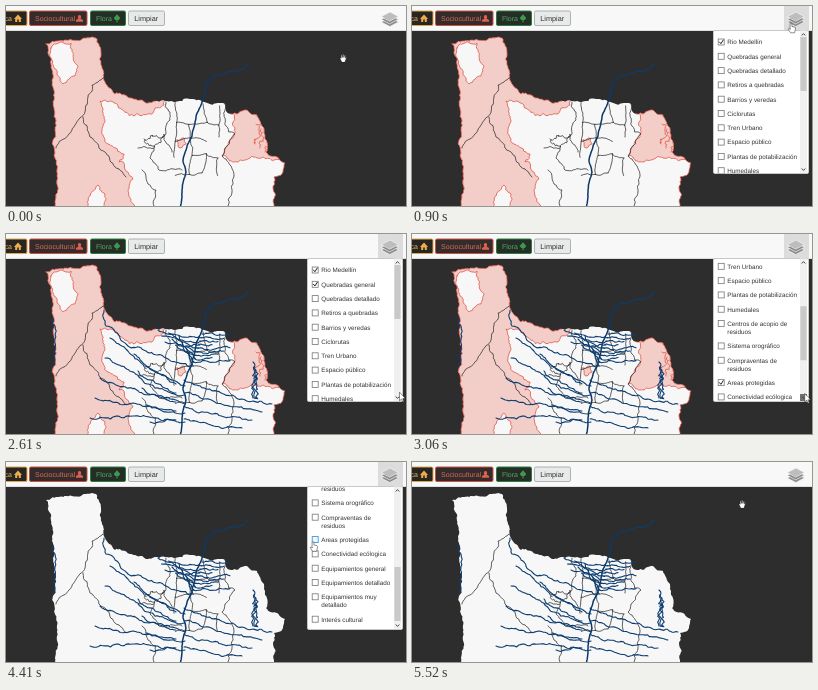
These frames come from a looping animation (400x200 px, 5550 ms). An HTML page:

```html
<!DOCTYPE html>
<html lang="es">
<head>
<meta charset="utf-8">
<title>Mapa de capas</title>
<style>
html, body { margin: 0; width: 100%; height: 100%; overflow: hidden; background: #2d2d2d; }
svg { display: block; width: 100vw; height: 100vh; }
text { font-family: "Liberation Sans", Arial, sans-serif; font-size: 7px; text-rendering: geometricPrecision; }
path { fill: none; stroke-linejoin: round; stroke-linecap: round; }
#rows text { font-size: 6.3px; fill: #333; }
#rows rect { fill: #fff; stroke: #777; stroke-width: .8; }
#rows rect.hover { fill: #eef8ff; stroke: #2e8bd0; }
#rows path { stroke: #222; }
.land, .hole { fill: #f7f7f7; }
.pink { fill: #f3cec9; }
.pink, .hole, .red { stroke: #e05648; stroke-width: .8; }
.border { stroke: #2a2a2a; stroke-width: .75; }
.stream { stroke: #0c3d70; stroke-width: 1.1; }
.river { stroke: #0b3867; stroke-width: 1.5; }
#cursor path { fill: #fff; stroke: #222; stroke-width: .5; }
</style>
</head>
<body>
<svg viewBox="0 0 400 200" preserveAspectRatio="none">
  <defs>
    <clipPath id="landClip"></clipPath>
    <clipPath id="sides"><path d="M0 0H150V200H0ZM224 0H400V200H224Z"/></clipPath>
    <clipPath id="panelClip"><rect x="302" y="24.5" width="86" height="143"/></clipPath>
  </defs>
  <rect width="400" height="200" fill="#2d2d2d"/>

  <g id="base"></g>
  <g id="pink">
    <g id="areas" clip-path="url(#landClip)"></g>
    <g id="edge" clip-path="url(#sides)"></g>
  </g>
  <g id="borders"></g>
  <g id="river"></g>
  <g id="streams"></g>

  <rect width="400" height="24" fill="#f8f8f8"/>
  <rect y="24" width="400" height="1" fill="#dedede"/>
  <rect x="-20" y="5" width="41" height="14.5" rx="1.5" fill="#292622" stroke="#d9a84c"/>
  <rect x="23.5" y="5" width="57.5" height="14.5" rx="1.5" fill="#332c2b" stroke="#c9503f"/>
  <rect x="84.5" y="5" width="35" height="14.5" rx="1.5" fill="#252d27" stroke="#2b7c3c"/>
  <rect x="122.5" y="5" width="36" height="14.5" rx="1.5" fill="#e8eaea" stroke="#adb2b2"/>
  <text x="-1.5" y="15" fill="#efb765">ca</text>
  <path d="M8 13 12 8.6 16 13H14.8V16H12.8V13.5H11.2V16H9.2V13Z" style="fill:#f0ad4e"/>
  <text x="29" y="15" fill="#d96b5c">Sociocultural</text>
  <path d="M73.5 9a1.7 2 0 0 1 1 3.6L77 14V15.8H70V14L72.5 12.6A1.7 2 0 0 1 73.5 9Z" style="fill:#e0604f"/>
  <text x="90" y="15" fill="#57a765">Flora</text>
  <path d="M111 8.2 114.3 12 112.8 14H111.6V16.2H110.4V14H109.2L107.7 12Z" style="fill:#3c9a4d"/>
  <text x="128.3" y="15" fill="#333" style="font-size:7.3px">Limpiar</text>

  <rect id="pressed" x="372" y="0" width="25" height="24" fill="#dcdcdc"/>
  <g id="layers"></g>

  <g id="panel">
    <rect x="301.5" y="24.5" width="95" height="143" rx="1.5" fill="#fff" stroke="#c8c8c8"/>
    <g clip-path="url(#panelClip)"><g id="rows"></g></g>
    <rect x="388" y="24.5" width="7" height="142.5" fill="#f0f0f0"/>
    <rect id="thumb" x="388.4" y="31" width="6.2" height="54" fill="#c9c9c9"/>
    <rect id="down" x="388" y="160" width="7" height="7" fill="#707070"/>
    <path d="M390 29.2 391.5 27.6 393 29.2M390 162.8 391.5 164.4 393 162.8" stroke="#444"/>
  </g>

  <g id="cursor">
    <path id="grab" d="M-1.3 8-3 4.5Q-3 3.3-1.8 4.2L-2 1.6Q-1.5.6-1 1.6L-.6 3.4-.5.8Q.2-.1.7.8L.8 3.4 1.4 1.3Q2.2.7 2.4 1.7L2.2 4 2.8 2.8Q3.6 2.6 3.4 3.8L2 8Z"/>
    <path id="finger" d="M-.9 4.8V.6Q0-.5.9.6V3.4L4 4.2Q4.8 4.7 4.5 6L3.6 9.8H-.4L-2.8 6.2Q-2.8 4.6-.9 6Z"/>
    <path id="arrow" d="M0 0V8.2L1.9 6.5 3.2 9.5 4.5 8.9 3.2 6H5.8Z"/>
  </g>
</svg>

<script>
const LOOP = 5550;
const $ = id => document.getElementById(id);
const lerp = (a, b, k) => a + (b - a) * k;
const clamp = v => Math.min(1, Math.max(0, v));
let seed = 4211;
const rand = () => (seed = seed * 16807 % 2147483647) / 2147483647;

function add(parent, tag, attrs, label = "") {
  const el = document.createElementNS("http://www.w3.org/2000/svg", tag);
  for (const key in attrs) el.setAttribute(key, attrs[key]);
  el.textContent = label;
  $(parent).append(el);
  return el;
}

// Fractal midpoint displacement gives survey lines their ragged look.
function rough(line, amount, closed) {
  const pts = line.trim().split(" ").map(p => p.split(",").map(Number));
  const split = (a, b) => {
    const d = Math.hypot(b[0] - a[0], b[1] - a[1]);
    if (d < 3) return [b];
    const k = Math.min(d * amount, 4);
    const m = a.map((v, i) => (v + b[i]) / 2 + (rand() - .5) * k);
    return [...split(a, m), ...split(m, b)];
  };
  const all = [pts[0]];
  pts.slice(1).forEach((p, i) => all.push(...split(pts[i], p)));
  if (closed) all.push(...split(pts.at(-1), pts[0]));
  return "M" + all.map(p => p.map(v => v.toFixed(1)).join(" ")).join("L") + (closed ? "Z" : "");
}
const draw = (parent, cls, amount, line, closed) =>
  add(parent, "path", { class: cls, d: rough(line, amount, closed) });

// Land and protected areas
const land = rough("40,38 50,35 75,34 90,32 95,46 96,62 99,76 109,88 124,92 140,97 159,95 184,93 " +
  "219,98 225,108 241,104 251,109 258,122 260,146 279,157 277,166 268,171 267,182 266,204 " +
  "50,204 51,170 47,134 50,115 47,96 46,75", .35, true);
add("landClip", "path", { d: land });
add("base", "path", { class: "land", d: land });
draw("areas", "pink", .5, "30,25 100,25 110,80 165,90 158,99 146,108 128,110 112,99 94,95 98,112 96,124 " +
  "102,138 118,148 113,156 120,165 127,173 122,184 128,204 30,206", true);
draw("areas", "pink", .5, "222,95 270,100 268,140 285,148 268,154 244,152 232,156 216,150 220,141 229,122", true);
draw("areas", "pink", .5, "171,134 178,132 180,138 174,142", true);
draw("areas", "hole", .4, "45,42 56,36 65,37 67,50 72,60 69,70 57,78 48,62", true);
draw("areas", "hole", .5, "80,206 84,190 92,179 99,188 98,206", true);
add("edge", "path", { class: "red", d: land });
for (let i = 0; i < 3; i++) {
  const x = 250 + i * 5;
  draw("areas", "red", 1.3, `${x},${118 + i * 5} ${x + 3},${128 + i * 4} ${x - 1},${138 + i * 4}`);
}

// Municipal borders, then jittered city blocks
[
  "98,72 86,79 82,91 79,106 66,124 50,142",
  "77,111 84,131 99,146 109,161 120,171",
  "160,96 164,106 164,114 158,130 166,146",
  "132,142 148,142 144,152 152,163 176,164",
  "219,98 220,120 229,128 219,142 216,150 228,170 222,200",
  "136,164 142,178 150,184 148,200",
].forEach(line => draw("borders", "border", .35, line));
draw("borders", "border", 1.4, "138,133 146,130 153,132 158,128 154,137 145,139 139,134");

const nodes = Array.from({ length: 5 }, (_, r) => Array.from({ length: 4 }, (_, c) =>
  [166 + c * 15 + rand() * 6, 96 + r * 17 + rand() * 7].map(v => v.toFixed(1)).join()));
nodes.forEach((row, r) => row.forEach((node, c) => {
  if (c < 3 && r > 0 && rand() < .65) draw("borders", "border", .25, `${node} ${row[c + 1]}`);
  if (r < 4 && rand() < .75) draw("borders", "border", .2, `${node} ${nodes[r + 1][c]}`);
}));

// River and tributaries
draw("river", "stream", .2, "242,58 232,65 208,70");
draw("river", "river", .1, "208,70 200,79 197,94 190,111 186,130 177,154 180,166 176,184 174,202");

function tributary(x, y, u, v, sag) {
  draw("streams", "stream", .3, `${x},${y} ${lerp(x, u, .45)},${lerp(y, v, .5) + sag} ${u},${v}`);
}
for (let i = 0; i < 9; i++) {
  const u = 196 - i * 1.1, v = 100 + i * 3.5;
  tributary(152 + i * 3.5, 96 + i % 3 * 5 + i, u, v + 4, 1);
  tributary(224 - i % 4 * 6, 101 + i * 3.2, u, v, 1);
}
for (let i = 0; i < 5; i++) {
  tributary(104 - i * 5, 104 + i * 20, 179, 152 + i * 9, 4 - i * 2);
  tributary(128 + i * 4, 120 + i * 17, 170, 150 + i * 9, 1);
  if (i < 4) tributary(266 - i * 10, 170 + i * 8, 178, 146 + i * 13, 3);
}
draw("streams", "stream", .3, "98,76 100,92 112,100 122,112 140,117 160,124 185,133");
draw("streams", "stream", .4, "47,84 49,100 47,132");
for (let i = 0; i < 3; i++) draw("streams", "stream", 1.2, `${247 + i},${128 + i * 5} ${250 - i},${146} ${247 + i * 2},164`);

// Layer icon and menu
for (let i = 2; i >= 0; i--) {
  const y = 10.5 + i * 2.7;
  add("layers", "path", {
    d: `M375.5 ${y}L384 ${y - 4.5}L392.5 ${y}L384 ${y + 4.5}Z`,
    style: `fill:${i ? "#8a8a8a" : "#bdbdbd"}`, stroke: "#f4f4f4", "stroke-width": .7
  });
}

const names = ["Rio Medellín", "Quebradas general", "Quebradas detallado", "Retiros a quebradas",
  "Barrios y veredas", "Ciclorutas", "Tren Urbano", "Espacio público", "Plantas de potabilización",
  "Humedales", "Centros de acopio de|residuos", "Sistema orográfico", "Compraventas de|residuos",
  "Areas protegidas", "Conectividad ecólogica", "Equipamientos general", "Equipamientos detallado",
  "Equipamientos muy|detallado", "Interés cultural"];
let nextY = 36;
const rows = names.map(name => {
  const y = nextY;
  const lines = name.split("|");
  nextY += 14.3 + (lines.length - 1) * 8.1;
  lines.forEach((part, i) => add("rows", "text", { x: 315.3, y: y + 2.3 + i * 8.2 }, part));
  return {
    y, end: nextY - 7,
    box: add("rows", "rect", { x: 306.2, y: y - 3, width: 6, height: 6 }),
    tick: add("rows", "path", { d: `M307.5 ${y}l1.4 1.7 2.3-3.6`, opacity: 0 })
  };
});
const [river, general, , , , , , , , , , , , protectedAreas] = rows;

// Pointer stops: time, x, y
const stops = [[30, 337, 48], [600, 379, 17], [900, 379, 17], [1440, 309, 50], [1620, 309, 50],
  [2160, 374, 66], [2580, 393.5, 158.5], [3360, 391.5, 160], [3510, 353.5, 122.5],
  [4080, 307, 79.5], [4530, 307, 79.5], [4990, 378, 17], [5100, 378, 17], [5520, 330, 38]];

// Monotone cubic: rests where the pointer turns, flows through the stops between.
function slope(i, axis) {
  if (!stops[i - 1] || !stops[i + 1]) return 0;
  const rate = j => (stops[j + 1][axis] - stops[j][axis]) / (stops[j + 1][0] - stops[j][0]);
  const a = rate(i - 1), b = rate(i);
  return a * b > 0 ? 2 * a * b / (a + b) : 0;
}
function pointer(t) {
  const i = Math.max(0, stops.findLastIndex((s, n) => s[0] <= t && n < stops.length - 1));
  const p = stops[i], q = stops[i + 1], span = q[0] - p[0];
  const k = clamp((t - p[0]) / span), m = 1 - k;
  return [1, 2].map(axis => p[axis] * m * m * (1 + 2 * k) + q[axis] * k * k * (3 - 2 * k)
    + span * k * m * (slope(i, axis) * m - slope(i + 1, axis) * k));
}

const show = (el, on) => el.setAttribute("opacity", on ? 1 : 0);
const shift = (id, x, y) => $(id).setAttribute("transform", `translate(${x} ${y})`);

function render(t) {
  const open = t >= 690 && t < 5055;
  const streams = t >= 1620, pink = t < 4200;
  const scrolled = clamp((t - 2760) / 540);
  const scroll = scrolled * 160.5;

  show($("panel"), open);
  show($("pressed"), open);
  show($("down"), scrolled > 0 && scrolled < 1);
  show($("streams"), streams);
  show($("pink"), pink);
  show(river.tick, true);
  show(general.tick, streams);
  show(protectedAreas.tick, pink);
  shift("rows", 0, -scroll);
  shift("thumb", 0, scrolled * 74);

  const [x, y] = pointer(t);
  const inPanel = open && x > 301 && y > 24 && y < 168;
  const shape = inPanel ? (x < 388 ? "finger" : "arrow") : y > 25 ? "grab" : x > 372 ? "finger" : "arrow";
  shift("cursor", x, y);
  for (const id of ["grab", "finger", "arrow"]) show($(id), id === shape);

  // The highlight trails the pointer by a tick.
  const [hx, hy] = pointer(t - 30);
  for (const row of rows) {
    const at = hy + scroll;
    row.box.classList.toggle("hover", inPanel && hx < 388 && at >= row.y - 7 && at < row.end);
  }
}

const start = performance.now();
function frame() {
  render((performance.now() - start) % LOOP);
  requestAnimationFrame(frame);
}
frame();
</script>
</body>
</html>
```
